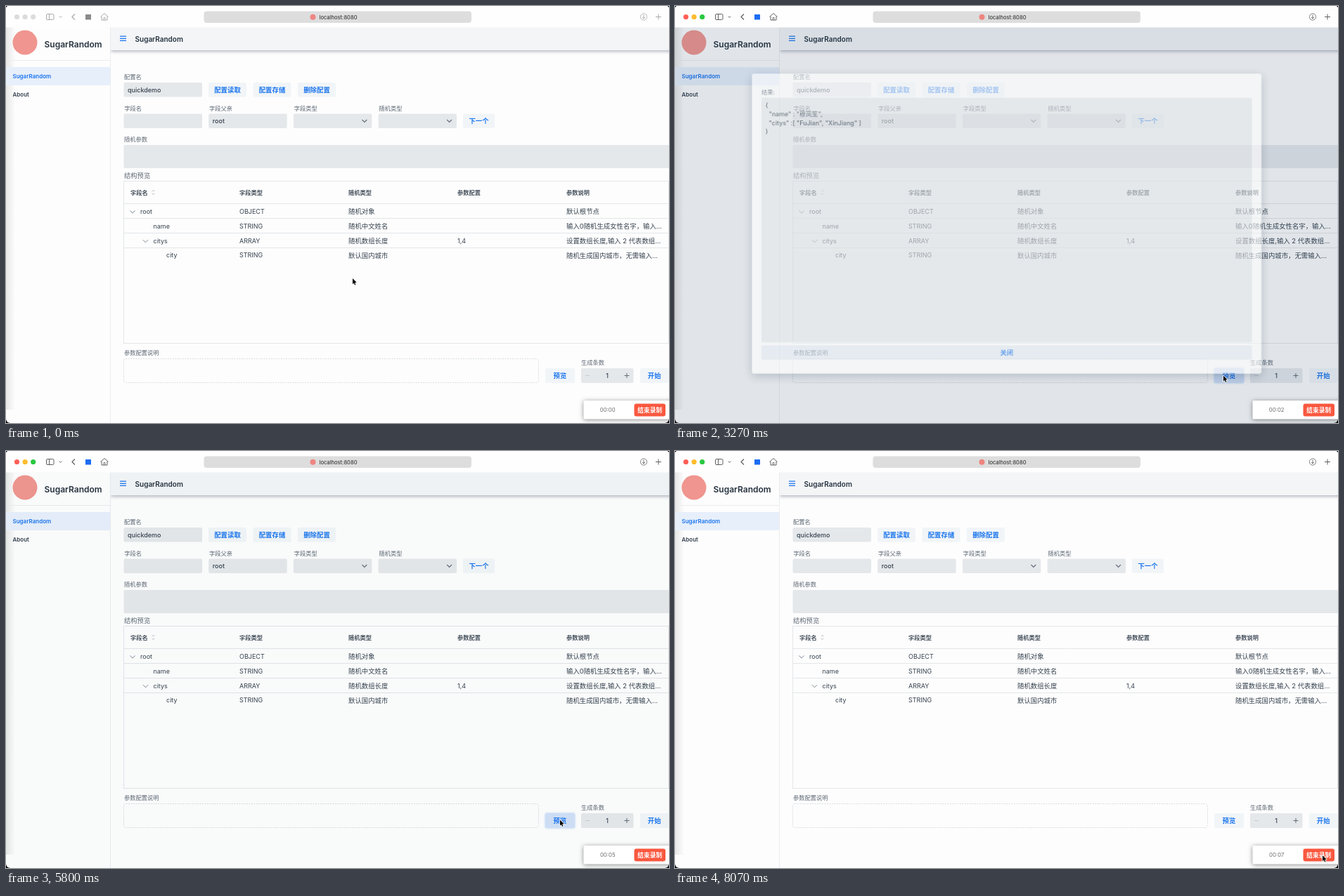
Animation, 943 px wide and 594 px high, one loop 8130 ms. Source, as an HTML page with a canvas:

```html
<!DOCTYPE html>
<html lang="zh">
<head>
<meta charset="utf-8">
<style>
html, body { margin: 0; width: 100%; height: 100%; overflow: hidden; background: #000; }
canvas { display: block; }
</style>
</head>
<body>
<canvas id="stage" width="943" height="594"></canvas>
<script>
const W = 943, H = 594, LOOP = 8130;
const FONT = 'Inter, "Noto Sans CJK SC", "Noto Sans CJK", sans-serif';
const INK = '#36424f', SOFT = '#5d6874', BLUE = '#1b75ee', FIELD = '#e5e8eb', PALE = '#f1f5f8', LINE = '#e3e6e9';
const screen = document.getElementById('stage').getContext('2d');
const layer = document.createElement('canvas');
layer.width = W;
layer.height = H;
const dialogCtx = layer.getContext('2d');
let c = screen;

function box(x, y, w, h, fill, r = 2) {
  c.fillStyle = fill;
  c.beginPath();
  c.roundRect(x, y, w, h, r);
  c.fill();
}

function dot(x, y, r, fill) {
  c.fillStyle = fill;
  c.beginPath();
  c.arc(x, y, r, 0, Math.PI * 2);
  c.fill();
}

function path(points, color, width = 1) {
  c.strokeStyle = color;
  c.lineWidth = width;
  c.beginPath();
  points.forEach(([x, y]) => c.lineTo(x, y));
  c.stroke();
}

// y is the visual middle of the line.
function text(str, x, y, size = 9, color = INK, weight = 400, align = 'left') {
  c.font = `${weight} ${size}px ${FONT}`;
  c.fillStyle = color;
  c.textAlign = align;
  c.fillText(str, x, y + size * 0.37);
}

const label = (str, x, y) => text(str, x, y, 8.25, SOFT, 500);

function button(str, x, y, w, h = 20.5, fill = PALE) {
  box(x, y, w, h, fill);
  text(str, x + w / 2, y + h / 2, 9.4, BLUE, 600, 'center');
}

function chevron(x, y, size, color, width = 1) {
  path([[x - size, y - size / 2], [x, y + size / 2], [x + size, y - size / 2]], color, width);
}

function shadow(color, blur, dy) {
  c.shadowColor = color;
  c.shadowBlur = blur;
  c.shadowOffsetY = dy;
}

function clearShadow() {
  shadow('transparent', 0, 0);
}

function titleBar(active) {
  const icon = active ? '#606060' : '#aaa';
  box(0, 0, W, 30.5, '#fefefe', 0);
  ['#fe5f57', '#febc2e', '#28c840'].forEach((color, i) =>
    dot(15.5 + i * 11.6, 15.5, 3.6, active ? color : '#dcdcdc'));
  c.strokeStyle = icon;
  c.lineWidth = 1;
  c.beginPath();
  c.roundRect(57.5, 11.5, 10.5, 8, 1.5);
  c.stroke();
  path([[61.5, 11.5], [61.5, 19.5]], icon);
  chevron(77.5, 15.5, 1.8, icon);
  path([[98, 11.5], [94, 15.5], [98, 19.5]], icon, 1.2);
  box(113, 12, 8, 7.5, active ? '#1c6cf2' : '#8a8a8a', 0);
  path([[134.5, 15.5], [140, 10.5], [145.5, 15.5]], icon);
  path([[136, 15], [136, 20], [144, 20], [144, 15]], icon);
  path([[139, 20], [139, 16.5], [141, 16.5], [141, 20]], icon, 0.8);
  box(281.5, 7.5, 380.5, 16.5, '#dddddd', 4);
  dot(436.5, 15.7, 4, '#ee8580');
  text('localhost:8080', 445.5, 15.8, 7.5, '#3c3c3c', 500);
  c.strokeStyle = icon;
  c.beginPath();
  c.arc(907, 15.5, 4.6, 0, Math.PI * 2);
  c.stroke();
  path([[907, 12.8], [907, 18]], icon, 0.9);
  path([[905.2, 16], [907, 18], [908.8, 16]], icon, 0.9);
  path([[924, 15.5], [932, 15.5]], icon);
  path([[928, 11.5], [928, 19.5]], icon);
}

function sidebar() {
  const shade = c.createLinearGradient(0, 0, 13, 0);
  shade.addColorStop(0, 'rgba(0,0,0,.09)');
  shade.addColorStop(1, 'rgba(0,0,0,0)');
  box(0, 30, 13, 545, shade, 0);
  path([[148.5, 30], [148.5, H]], '#e9ecee');
  path([[0, 77.5], [148, 77.5]], '#e9ecee');
  dot(27, 52, 17.5, '#f0958f');
  text('SugarRandom', 54.5, 54.5, 12, '#26323f', 600);
  box(0, 87, 148, 26, '#e7effb', [0, 2, 2, 0]);
  text('SugarRandom', 9.5, 100.5, 8, BLUE, 600);
  text('About', 9.5, 126, 8, INK, 600);
}

function navBar() {
  c.save();
  c.beginPath();
  c.rect(149, 30, W, 50);
  c.clip();
  shadow('rgba(25,45,70,.38)', 5, 1.5);
  box(149, 30, W, 33, '#f3f5f7', 0);
  c.restore();
  for (const y of [43.2, 46.3, 49.4]) path([[162, y], [171, y]], BLUE, 1.2);
  text('SugarRandom', 183.5, 46.8, 10, '#26323f', 600);
}

function form() {
  label('配置名', 168, 100.5);
  box(167.5, 109, 111.5, 20.5, FIELD);
  text('quickdemo', 173, 119.5, 9, INK, 500);
  button('配置读取', 288, 109, 54);
  button('配置存储', 351.5, 109, 54);
  button('删除配置', 415, 109, 54);
  ['字段名', '字段父亲', '字段类型', '随机类型'].forEach((name, i) => {
    const x = 167.5 + i * 120.7;
    label(name, x + 0.8, 145.5);
    box(x, 153.5, 111.5, 20.5, FIELD);
    if (i === 1) text('root', x + 5.5, 164, 9, INK, 500);
    if (i > 1) chevron(x + 101, 163.7, 3.4, '#626d79', 1.2);
  });
  button('下一个', 650, 153.5, 45);
  label('随机参数', 168, 190);
  box(167.5, 198, W, 33, FIELD);
}

const COLUMNS = [177, 332, 487, 642, 797];
const ROWS = [
  ['root', 'OBJECT', '随机对象', '', '默认根节点'],
  ['name', 'STRING', '随机中文姓名', '', '输入0随机生成女性名字，输入…'],
  ['citys', 'ARRAY', '随机数组长度', '1,4', '设置数组长度,输入 2 代表数组…'],
  ['city', 'STRING', '默认国内城市', '', '随机生成国内城市，无需输入…']
];
const INDENT = [14, 32.5, 32.5, 51];

function grid() {
  text('结构预览', 168, 241.5, 9.3, SOFT, 500);
  c.strokeStyle = LINE;
  c.lineWidth = 1;
  c.strokeRect(167.5, 249.5, 775, 231);
  for (const y of [281.5, 302.5, 323.5, 344.5]) path([[168, y], [W, y]], LINE);
  ['字段名', '字段类型', '随机类型', '参数配置', '参数说明'].forEach((name, i) =>
    text(name, COLUMNS[i], 266, 8.25, '#46515d', 600));
  chevron(209.5, 263.3, -1.8, '#b4bac1');
  chevron(209.5, 267.7, 1.8, '#b4bac1');
  ROWS.forEach((row, r) => row.forEach((cell, i) =>
    text(cell, COLUMNS[i] + (i ? 0 : INDENT[r]), 292.7 + r * 20.8, i === 2 || i === 4 ? 9.4 : 9)));
  chevron(180, 293.3, 3.6, '#7c8690');
  chevron(198.5, 335, 3.6, '#7c8690');
}

function footer(t) {
  label('参数配置说明', 168, 494.2);
  c.setLineDash([2, 1.5]);
  c.strokeStyle = '#d9dde1';
  c.lineWidth = 1;
  c.beginPath();
  c.roundRect(167.5, 502.5, 590, 34, 3);
  c.stroke();
  c.setLineDash([]);
  const pressed = t >= 3200 && t < 3400 || t >= 5800 && t < 6070;
  const hover = t >= 2070 && t < 3200 || t >= 5400 && t < 5800;
  if (pressed) shadow('rgba(27,117,238,.35)', 3, 0);
  box(767, 516, 42, 21, pressed ? '#cfdff7' : hover ? '#dde8f9' : PALE);
  clearShadow();
  text('预览', 788, 526.7, 9.4, BLUE, 600, 'center');
  label('生成条数', 818, 508.3);
  box(818, 516, 74.5, 21, FIELD);
  path([[824, 526.5], [830, 526.5]], '#c5cad0');
  text('1', 855, 526.8, 9, INK, 500, 'center');
  path([[879.5, 526.5], [886.5, 526.5]], '#616c78');
  path([[883, 523], [883, 530]], '#616c78');
  button('开始', 902, 516, 40.5, 21);
}

function recorder(t) {
  const seconds = Math.floor((t - 400) / 1000);
  shadow('rgba(0,0,0,.45)', 6, 1);
  box(821.5, 562, W, 26.5, '#fff', 2);
  clearShadow();
  text(`00:0${Math.max(0, seconds)}`, 855.7, 575.3, 7.8, '#6d6d6d', 400, 'center');
  box(893.5, 566.5, 44.5, 18, '#f9583f', 3);
  text('结束录制', 915.7, 575.5, 8.7, '#fff', 600, 'center');
}

function dialog(second, closeFill) {
  const lines = second
    ? ['"name" : "岑朔",', '"citys" :[ "HeNan", "GuangDong" ]']
    : ['"name" : "穆岚笙",', '"citys" :[ "FuJian", "XinJiang" ]'];
  c = dialogCtx;
  c.clearRect(0, 0, W, H);
  shadow('rgba(20,40,70,.35)', 14, 4);
  box(102, 92, 739.5, 436, '#fff', 3);
  clearShadow();
  label('结果:', 116, 119);
  box(116, 127, 711.5, 355.5, '#e6eaec');
  ['{', ...lines, '}'].forEach((line, i) =>
    text(line, i % 3 ? 126.5 : 121.5, 138 + i * 12.6, 9, INK, 500));
  button('关闭', 116, 487, 711.5, 20.5, closeFill);
  c = screen;
}

// Start time, dialog opacity, dialog scale, backdrop strength.
const OVERLAY = [
  [0, 0, 1, 0], [3200, 0, 0.95, 0.25], [3270, 0.6, 0.98, 0.75], [3400, 1, 1, 1],
  [4800, 0.88, 1.002, 1], [4870, 0, 1, 0.5], [5000, 0, 1, 0.1],
  [6000, 0.6, 0.98, 0.75], [6070, 1, 1, 1],
  [7270, 0.88, 1.002, 1], [7400, 0, 1, 0.3], [7470, 0, 1, 0]
];

// Pointer stops: time, x, y.
const POINTER = [
  [0, 493, 388], [670, 742, 492], [1000, 742, 492], [1200, 776, 508], [1400, 776, 508],
  [1670, 780, 526.5], [3870, 780, 526.5], [4400, 698.5, 490.5], [4800, 698.5, 490.5],
  [5600, 788, 525.5], [6200, 788, 525.5], [7200, 672, 494.5], [7270, 672, 494.5], [8070, 921, 576]
];

function pointerAt(t) {
  const next = POINTER.findIndex(stop => stop[0] > t);
  if (next < 0) return POINTER[POINTER.length - 1].slice(1);
  const [t0, x0, y0] = POINTER[next - 1], [t1, x1, y1] = POINTER[next];
  const u = (t - t0) / (t1 - t0), k = u * u * (3 - 2 * u);
  return [x0 + (x1 - x0) * k, y0 + (y1 - y0) * k];
}

function pointer(x, y) {
  c.save();
  c.translate(x, y);
  c.beginPath();
  [[0, 0], [0, 8.2], [1.9, 6.5], [3.1, 9.4], [4.4, 8.9], [3.2, 6], [5.7, 5.8]]
    .forEach(([px, py]) => c.lineTo(px, py));
  c.closePath();
  c.strokeStyle = '#fff';
  c.lineWidth = 1.6;
  c.lineJoin = 'round';
  c.stroke();
  c.fillStyle = '#000';
  c.fill();
  c.restore();
}

function draw(t) {
  c.fillStyle = '#000';
  c.fillRect(0, 0, W, H);
  c.save();
  c.beginPath();
  c.roundRect(0, 0, W, H, [4, 4, 6, 6]);
  c.clip();
  box(0, 0, W, H, '#fdfdfd', 0);
  sidebar();
  navBar();
  form();
  grid();
  footer(t);

  const [, alpha, scale, dim] = OVERLAY.filter(key => key[0] <= t).pop();
  box(0, 30, W, H, `rgba(28,56,90,${0.16 * dim})`, 0);
  if (alpha) {
    dialog(t >= 6000, t >= 7270 || t >= 4800 && t < 6000 ? '#d6e2f5' : '#e8eff6');
    c.save();
    c.globalAlpha = alpha;
    c.translate(471.7, 310);
    c.scale(scale, scale);
    c.drawImage(layer, -471.7, -310);
    c.restore();
  }
  titleBar(t >= 2070);
  recorder(t);
  pointer(...pointerAt(t));
  c.restore();
}

function frame() {
  const t = performance.now() % LOOP;
  draw(Math.floor(t / 200) * 200 + (t % 200 >= 70 ? 70 : 0));
  requestAnimationFrame(frame);
}
frame();
</script>
</body>
</html>
```
